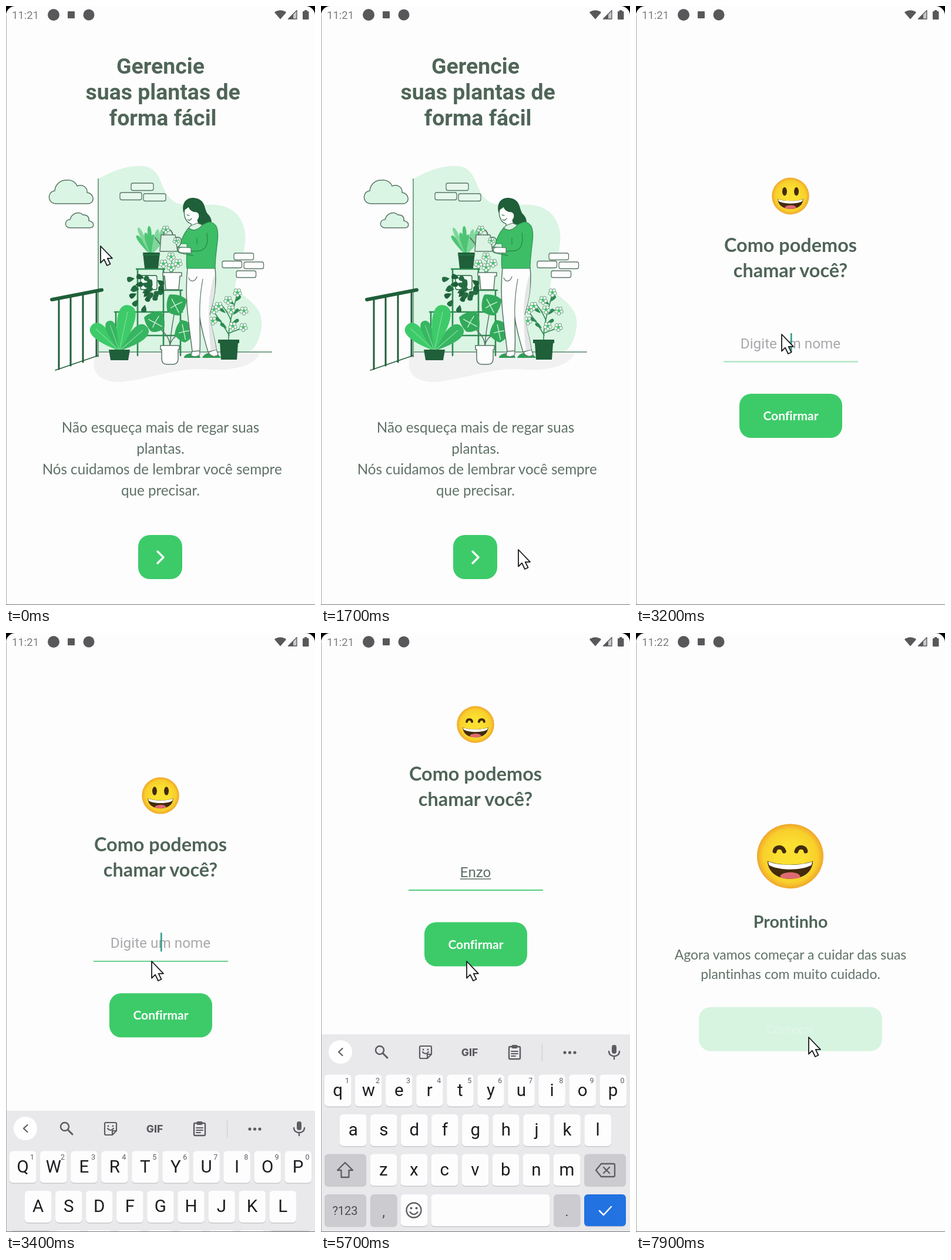
Write an HTML page that moves like this. It is 526 px wide and 1018 px high and loops after 8000 ms.

```html
<!DOCTYPE html>
<html lang="pt-BR">
<head>
<meta charset="utf-8">
<title>Plantas</title>
<style>
html, body { margin: 0; width: 100%; height: 100%; overflow: hidden; background: #fefdfe; }
svg { display: block; width: 100%; height: 100%; }
text { font-family: Roboto, sans-serif; font-variant-ligatures: none; }
.geo { font-family: Lato, sans-serif; fill: #5f7267; text-anchor: middle; }
.bold { font-weight: 700; fill: #4f6558; }
.cta { font-weight: 700; fill: #fff; font-size: 21px; }
.mid { text-anchor: middle; }
</style>
</head>
<body>
<svg id="stage" viewBox="0 0 526 1018"></svg>
<script>
const BG = '#fefdfe', GREEN = '#3dcb69', DARK = '#1f5f39', MID = '#34a65a', PALE = '#daf5e3', INK = '#5a7566';
const NAME = 'Enzo';

const path = (d, fill = 'none', stroke = 'none', w = 1.5) =>
  `<path d="${d}" fill="${fill}" stroke="${stroke}" stroke-width="${w}" stroke-linecap="round" stroke-linejoin="round"/>`;
const box = (x, y, w, h, r, fill, stroke = 'none', sw = 1.3) =>
  `<rect x="${x}" y="${y}" width="${w}" height="${h}" rx="${r}" fill="${fill}" stroke="${stroke}" stroke-width="${sw}"/>`;
const dot = (x, y, r, fill, ry = r) => `<ellipse cx="${x}" cy="${y}" rx="${r}" ry="${ry}" fill="${fill}"/>`;
const label = (x, y, s, cls = '', style = '') => `<text x="${x}" y="${y}" class="${cls}" style="${style}">${s}</text>`;
const group = (id, inner) => `<g id="${id}">${inner}</g>`;
const at = (x, y, inner, extra = '') => `<g transform="translate(${x} ${y}) ${extra}">${inner}</g>`;

// Leaf growing upwards from x,y, turned by a degrees
const leaf = (x, y, len, w, a, fill, vein) => at(x, y,
  path(`M0 0C${-w * .5} ${-len * .3} ${-w * 1.4} ${-len} 0 ${-len}C${w * 1.4} ${-len} ${w * .5} ${-len * .3} 0 0Z`, fill) +
  (vein ? path(`M0 0V${-len * .85}`, 'none', vein, 1) : ''), `rotate(${a})`);

const flower = (x, y, r) => {
  let s = '';
  for (let i = 0; i < 5; i++) {
    const a = i * 1.257 + .3;
    s += `<circle cx="${x + Math.cos(a) * r * .6}" cy="${y + Math.sin(a) * r * .6}" r="${r * .38}" fill="#f1fbf4" stroke="#4f8f68" stroke-width=".9"/>`;
  }
  return s + dot(x, y, r * .32, GREEN);
};

function illustration() {
  let s = path('M157 294C182 279 213 268 240 273C270 283 260 320 291 335C322 346 366 324 394 355C425 394 393 440 390 480C412 499 439 513 435 545C432 570 422 588 408 588H157Z', PALE);
  s += path('M155 588C138 620 160 644 205 638C258 630 298 613 350 618C400 620 428 606 432 588Z', '#f1f1f2');
  s += path('M157 294V596M157 588H452', 'none', '#7aa389', 2);

  // clouds and bricks
  s += path('M84 336C69 334 71 315 83 314C84 302 94 295 104 296C112 295 119 300 121 306C131 302 139 309 138 317C150 318 152 334 141 336Z', PALE, INK);
  s += path('M108 377C98 375 100 363 109 363C112 352 124 348 131 355C139 354 142 360 141 365C151 367 151 376 143 377Z', PALE, INK);
  for (const [x, y, w] of [[213, 301, 38], [194, 317, 37], [234, 319, 38]]) s += box(x, y, w, 12.5, 3, '#e6f8ec', INK);
  for (const [x, y] of [[388, 420], [368, 433.5], [405, 435], [392, 450]]) s += box(x, y, 33.5, 11.5, 3, BG, INK);

  // railing
  for (const [x, a, b] of [[90, 497, 617], [110, 493, 611], [131, 489, 605], [154, 484, 595]]) s += path(`M${x} ${a}V${b}`, 'none', DARK, 3);
  s += path('M84 619L157 594', 'none', DARK, 1.5) + path('M78 499L163 482.5', 'none', DARK, 6);

  // stand
  s += path('M224 447V594M268 447V594M297 483V594M187 520V590M222 447H270M264 483H300M185 520H300M224 560H297', 'none', '#2f8a52', 2.6);

  // top plant
  for (const [a, n] of [[-36, 42], [-25, 52], [-14, 40], [-4, 50], [6, 36], [15, 46], [25, 54], [35, 44]]) s += leaf(247, 424, n, 4.5, a, a % 2 ? '#7fd79b' : '#4cc474');
  s += path('M233 419H262L259 446H236Z', DARK) + path('M233 423H262', 'none', '#2f8a52', 1);

  // vine
  s += box(229, 458, 28, 24, 3, '#eefaf2', DARK);
  for (let i = 0; i < 22; i++) {
    const a = i * 2.4, r = 6 + i;
    s += leaf(238 + Math.cos(a) * r * 1.15, 483 + Math.sin(a) * r, 13, 6, i * 67, i % 3 ? '#246b41' : DARK);
  }

  // white flower pot
  s += path('M281 456L272 432M281 456L283 424M281 456L292 436', 'none', MID, 1.5);
  for (const [x, y] of [[268, 438], [281, 426], [293, 437], [281, 444]]) s += flower(x, y, 7.5);
  s += path('M267 453H299V459H296L294 482H272L270 459H267Z', BG, INK);

  // broad leaves
  for (const [a, n, w, c] of [[-47, 64, 17, GREEN], [49, 62, 17, '#37b661'], [-20, 54, 12, '#37b661'], [12, 79, 20, GREEN]])
    s += leaf(193, 586, n, w, a, c, '#8fe0a8');
  s += path('M175 584H211L208 602H178Z', DARK);

  // split leaves in a white pot
  s += path('M279 578C279 558 262 552 256 540M279 578C281 545 286 530 288 512M279 578C282 560 295 560 303 552', 'none', INK, 1.5);
  for (const [x, y, a] of [[254, 537, -20], [289, 508, 14], [304, 553, 30]])
    s += at(x, y, path('M-15 -14C-6 -18 8 -18 16 -13C17 -5 16 8 10 16C2 18 -6 17 -12 13C-16 4 -17 -6 -15 -14Z', '#32a95a') +
      path('M-9 -8L8 11M0 0L9 -7M0 0L-7 7', 'none', '#c9f0d6', 1.4), `rotate(${a})`);
  s += path('M263 577H295V584H293V599C293 606 289 609 284 609H274C269 609 265 606 265 599V584H263Z', BG, INK);

  // right flower plant
  s += path('M379 568C378 540 388 515 394 487M380 560C372 545 364 535 353 518M380 556C388 552 398 550 404 546M383 535C378 520 372 515 365 505M386 520C392 518 400 515 405 518', 'none', '#2f8a52', 1.6);
  for (const [x, y, a] of [[376, 548, -50], [386, 525, 45], [384, 540, 60], [368, 537, -60], [390, 503, 40], [374, 522, -50], [389, 508, -50]]) s += leaf(x, y, 14, 4, a, '#2f8a52');
  for (const [x, y] of [[394, 487], [378, 500], [354, 516], [352, 535], [383, 516], [405, 518], [404, 546], [386, 544], [362, 510]]) s += flower(x, y, 7.5);
  s += path('M361 567H397V573H395L393 601H366L364 573H361Z', DARK);

  // gardener
  s += path('M303 598C303 592 314 588 328 590L331 598ZM334 598C336 591 350 586 358 590L367 598Z', '#2f9e55');
  s += path('M318 582L315 594C320 597 327 596 330 592L329 580ZM344 578L346 591C351 597 358 596 361 592L356 578Z', BG, INK, 1.2);
  s += path('M309 445H356C359 475 354 500 346 528C350 550 356 566 358 584L344 588C338 568 333 550 330 530C330 550 331 570 330 586L317 587C313 550 303 500 309 445Z', BG, INK);
  s += path('M353 462C346 490 341 520 349 586L358 584C355 560 346 535 347 522C354 500 358 480 355 456Z', '#e3e6e4');
  s += path('M330 530C329 505 332 480 335 464M311 462C314 470 322 469 325 460', 'none', INK, 1.2);
  s += path('M302 350C298 331 311 323 325 327C341 332 337 347 344 354C352 362 351 372 345 374C334 378 323 373 318 366Z', DARK);
  s += path('M304 346C302 354 305 368 315 370L316 378L330 376L326 364C331 358 329 352 325 350C318 350 313 347 311 341Z', BG, DARK, 1.2);
  s += path('M308 355L312 356M309 363C312 365 314 364 316 361', 'none', DARK, 1.2);
  s += path('M264 389H288L292 417H262ZM288 394C299 388 303 404 292 410', '#dcf3e4', INK);
  s += path('M262 404L254 394M268 389C270 378 281 376 284 389', 'none', INK, 2) + flower(272, 380, 7) + flower(290, 399, 6);
  s += path('M311 377C322 383 334 370 346 367C360 368 362 382 360 400C357 424 356 434 356 446H308C306 430 309 416 308 404L297 404C300 392 305 384 311 377Z', '#3dbd66', '#2a9250', 1.2);
  s += path('M342 386C345 404 340 414 330 416L314 417L313 411L294 410C290 413 292 420 298 420L318 424', 'none', '#2a8a4c', 1.3);
  s += path('M315 411L298 410C292 412 292 418 298 419L315 420Z', BG, INK, 1.2) + path('M311 377C319 385 330 378 334 372L326 369L315 373Z', PALE, INK, 1.2);
  s += path('M325 394V405', 'none', '#2a8a4c', 1.2);
  return s;
}

// Face of radius 60 around the origin
const face = happy => `<circle r="60" fill="url(#skin)"/>` +
  (happy
    ? path('M-28 -9C-27 -19 -13 -19 -11 -9M11 -9C13 -19 27 -19 28 -9', 'none', '#422b0d', 7.5)
    : dot(-19, -15, 7.5, '#422b0d', 14) + dot(19, -15, 7.5, '#422b0d', 14)) +
  path('M-41 9C-20 18 20 18 41 9C40 31 22 42 0 42C-22 42 -40 31 -41 9Z', '#422b0d') +
  path('M-18 39C-20 27 20 27 18 39C8 43 -8 43 -18 39Z', '#e06a72') +
  path('M-40 10C-20 18 20 18 40 10L38 17C20 27 -20 27 -38 17Z', '#fff');

const card = inner => box(0, 0, 526, 1018, 0, BG) + inner;
// Rows starting with a space keep half of it as an indent
const lines = (rows, y, step, cls, size) => rows.map((r, i) =>
  label(263 + (r[0] === ' ' ? size * .11 : 0), y + i * step, r.trim(), cls, `font-size:${size}px`)).join('');

function keyboard() {
  const key = (x, y, w, fill = '#fdfdfe') => box(x, y + 1.5, w, 54, 6, '#c9c9cd') + box(x, y, w, 54, 6, fill);
  const grey = '#cbcbd0', ico = '#5c5d61';
  let s = box(0, 682, 526, 336, 0, '#e9e9ec') + dot(33, 712, 20, '#fff') + path('M36.5 706L30 712L36.5 718', 'none', ico, 2.2);
  s += `<circle cx="100" cy="709" r="7" fill="none" stroke="${ico}" stroke-width="2.5"/>` + path('M105.5 714.5L113 722', 'none', ico, 3);
  s += path('M170 702H186Q188 702 188 704V716L181 723H170Q168 723 168 721V704Q168 702 170 702ZM181 723V716H188M173 712Q178 718 183 712', 'none', ico, 2.2) + dot(174, 708, 1.4, ico) + dot(182, 708, 1.4, ico);
  s += label(253, 718.5, 'GIF', 'mid', `font:800 17.5px Inter,sans-serif;fill:${ico}`);
  s += box(320, 703, 19, 21, 2, 'none', ico, 2.4) + box(324.5, 700, 10, 6, 2, ico) + path('M324 711H335M324 715H335M324 719H331', 'none', ico, 1.8);
  s += path('M376.5 698V727', 'none', '#cfcfd3', 1.3) + [415, 423.5, 432].map(x => dot(x, 713, 2.6, ico)).join('');
  s += box(495, 700, 8, 15, 4, ico) + path('M490 711C490 722 508 722 508 711M499 720V724', 'none', ico, 2.4);

  [['qwertyuiop', 6, 750.5], ['asdfghjkl', 32, 818], ['zxcvbnm', 83.5, 885.5]].forEach(([row, x0, y], r) => {
    [...row].forEach((c, i) => {
      const x = x0 + i * 52.05;
      s += key(x, y, 45.5) + label(x + 22.7, y + 36, c, 'mid key', 'font-size:29.5px;fill:#1d1d20');
      if (!r) s += label(x + 38.5, y + 14.5, (i + 1) % 10, 'mid', 'font-size:12.5px;fill:#5c5d61');
    });
  });
  s += key(6, 885.5, 71, grey) + `<path id="shift" d="M41 900L54 913H47.5V925H34.5V913H28Z" fill="none" stroke="${ico}" stroke-width="2.3" stroke-linejoin="round"/>`;
  s += key(448, 885.5, 71, grey) + path('M477 902H498Q500 902 500 904V922Q500 924 498 924H477L468 913ZM481 908L491 918M491 908L481 918', 'none', ico, 2.3);
  s += key(6, 954, 71, grey) + label(41, 989, '?123', 'mid', 'font-size:20px;fill:#4c4d51');
  s += key(84, 954, 45.5, grey) + label(106.5, 992, ',', 'mid', 'font-size:24px;fill:#4c4d51');
  s += key(136, 954, 45.5) + `<circle cx="158" cy="981" r="12.5" fill="none" stroke="${ico}" stroke-width="2.3"/>` + dot(153.5, 977.5, 2, ico) + dot(162.5, 977.5, 2, ico) + path('M151.5 984Q158 992 164.5 984', 'none', ico, 2.2);
  s += key(187.5, 954, 202) + key(396, 954, 45.5, grey) + label(418.5, 991, '.', 'mid', 'font-size:24px;fill:#4c4d51');
  return s + key(448, 954, 71, '#2272e2') + path('M474 982L481 989L494 975', 'none', '#fff', 2.5);
}

const statusBar = path('M0 0H16A16 16 0 0 0 0 16ZM526 0H510A16 16 0 0 1 526 16Z', '#000') +
  path('M.5 16V1018', 'none', '#a9a9ab', 1) + path('M0 1017.5H526', 'none', '#77777a', 1) +
  group('clock', label(10, 22, '', '', 'font-size:18.5px;fill:#7c7c80')) +
  dot(81, 15, 10, '#58585b') + box(105, 9, 12, 12, 1, '#58585b') + dot(141, 15, 9.5, '#58585b') +
  path('M457 11C462 6 472 6 477 11L467 22.5Z', '#58585b') + path('M480.5 22H495V7.5Z', '#c9c9cb', '#58585b', 1.3) + path('M480.5 22H489V13.5Z', '#58585b') +
  path('M505 10Q505 9 506 9H508V7H512.5V9H514.5Q515.5 9 515.5 10V22Q515.5 23 514.5 23H506Q505 23 505 22Z', '#58585b');

document.getElementById('stage').innerHTML =
  `<defs><radialGradient id="skin"><stop offset=".4" stop-color="#fbe032"/><stop offset=".82" stop-color="#f8cf2b"/><stop offset="1" stop-color="#f0a62c"/></radialGradient></defs>` +
  box(0, 0, 526, 1018, 0, BG) +
  group('s1', card(
    lines(['Gerencie', ' suas plantas de', ' forma fácil'], 114.5, 44, 'mid bold', 37.4) + illustration() +
    lines(['Não esqueça mais de regar suas', 'plantas.', ' Nós cuidamos de lembrar você sempre', 'que precisar.'], 725, 35.6, 'geo', 24.2) +
    group('b1', box(225, 899, 75, 75, 20, GREEN) + path('M258 927L268 937L258 947', 'none', '#fff', 3.4)))) +
  group('s2', card(group('form',
    at(263, 323, group('open', face(false)) + group('grin', face(true)), 'scale(.53 .52)') +
    lines(['Como podemos', 'chamar você?'], 418, 43, 'geo bold', 32.4) +
    group('hint', label(263, 582, 'Digite um nome', 'mid', 'font-size:24.3px;fill:#a9a9ad')) +
    group('typed', label(263, 582, '', 'mid', 'font-size:24.2px;fill:#5f6f66')) +
    '<path id="under" stroke="#5f6f66" stroke-width="1.4"/>' +
    '<rect id="caret" y="556" width="2.6" height="32" fill="#2f9e8a"/>' +
    '<path id="rule" d="M149 604.5H378"/>' +
    group('b2', box(176, 659, 175, 75, 20, GREEN) + label(263.5, 704, 'Confirmar', 'geo cta'))))) +
  group('s3', card(
    at(262.5, 379.3, face(true), 'scale(.943 .915)') +
    lines(['Prontinho'], 500.5, 0, 'geo bold', 28.6) +
    lines(['Agora vamos começar a cuidar das suas', 'plantinhas com muito cuidado.'], 554.5, 33, 'geo', 22.9) +
    group('b3', box(107, 635.7, 312, 75, 20, GREEN) + label(263, 680.5, 'Começar', 'geo cta')))) +
  group('keys', keyboard()) + statusBar +
  group('mouse', path('M1 1V29.5L7 23.7L12 34L17.5 31.5L12.7 21.8H21Z', '#fff', '#1b1b1f', 1.8));

const $ = id => document.getElementById(id);
const put = (id, k, v) => $(id).setAttribute(k, v);
const show = (id, on) => put(id, 'visibility', on ? 'inherit' : 'hidden');
const keyText = [...document.querySelectorAll('.key')].map(el => [el, el.textContent]);
const clock = $('clock').firstChild, typed = $('typed').firstChild;

// Piecewise linear value from rows of [input, output]
function track(rows, v) {
  if (v <= rows[0][0]) return rows[0][1];
  for (let i = 1; i < rows.length; i++) {
    const [a, x] = rows[i - 1], [b, y] = rows[i];
    if (v <= b) return x + (y - x) * (v - a) / (b - a);
  }
  return rows[rows.length - 1][1];
}

function ease(x) {
  if (x <= 0) return 0;
  if (x >= 1) return 1;
  const b = (s, p, q) => 3 * (1 - s) ** 2 * s * p + 3 * (1 - s) * s * s * q + s ** 3;
  let lo = 0, hi = 1;
  for (let i = 0; i < 24; i++) {
    const m = (lo + hi) / 2;
    if (b(m, .20833, .25) < x) lo = m; else hi = m;
  }
  return b(lo, .82, 1);
}

const FADE = [[0, 0], [.75, 0], [.875, 1], [1.2075, 1], [2, 0]];
const ZOOM = [[0, .85], [1, 1], [2, 1.075]];
const MOUSE_X = [[0, 160], [900, 380], [1200, 380], [1700, 335], [1900, 282], [2300, 282], [2900, 247], [6200, 247], [6400, 238], [6800, 226], [7700, 293]];
const MOUSE_Y = [[0, 407], [900, 860], [1200, 860], [1700, 923], [1900, 938], [2300, 938], [2900, 557], [6200, 557], [6400, 576], [6800, 612], [7700, 686]];
const TYPED_AT = [4300, 4500, 4800, 5200];

function place(id, p) {
  const k = track(ZOOM, p), o = track(FADE, p);
  put(id, 'transform', `translate(263 509) scale(${k}) translate(-263 -509)`);
  put(id, 'opacity', o);
  show(id, o > 0);
}

// Button and its label fade separately
function press(id, t, down, up) {
  const o = track([[down, 1], [down + 150, .2], [up, .2], [up + 250, 1]], t);
  put(id, 'fill-opacity', o);
  put(id, 'stroke-opacity', o);
}

function draw(t) {
  const p2 = ease((t - 2200) / 400), p3 = ease((t - 6226) / 400);
  place('s1', 1 + p2);
  place('s2', p2 + p3);
  place('s3', p3);
  press('b1', t, 2000, 2250);
  press('b2', t, 5950, 6150);
  press('b3', t, 7750, 9000);

  put('keys', 'transform', `translate(0 ${track([[3200, 336], [3400, 130], [3600, 0], [6000, 0], [6300, 336]], t)})`);
  put('form', 'transform', `translate(0 ${track([[3300, 0], [3600, -140], [3800, -167.5], [6100, -167.5], [6300, 0]], t)})`);

  const n = TYPED_AT.filter(a => t >= a).length;
  show('open', !n);
  show('grin', n);
  show('hint', !n);
  typed.textContent = NAME.slice(0, n);
  const half = n ? typed.getComputedTextLength() / 2 : 0;
  put('caret', 'x', 263 + half);
  show('caret', (t >= 3100 && t < 3600) || (t >= 4100 && t < 5700));
  put('under', 'd', n > 1 ? `M${263 - half} 585.5H${263 + half}` : '');
  put('rule', 'stroke', t < 3100 ? '#cfcfd1' : t < 3300 ? '#b0e6c3' : '#55cc7e');
  put('rule', 'stroke-width', t < 3300 ? 2.4 : 1.8);
  for (const [el, c] of keyText) el.textContent = n ? c : c.toUpperCase();
  put('shift', 'fill', n ? 'none' : '#5c5d61');

  clock.textContent = t < 7300 ? '11:21' : '11:22';
  put('mouse', 'transform', `translate(${track(MOUSE_X, t)} ${track(MOUSE_Y, t)})`);
}

const start = performance.now();
let last = -1;
function tick() {
  // ten pictures a second
  const t = Math.floor((performance.now() - start) % 8000 / 100) * 100;
  if (t !== last) draw(last = t);
  requestAnimationFrame(tick);
}
tick();
</script>
</body>
</html>
```
